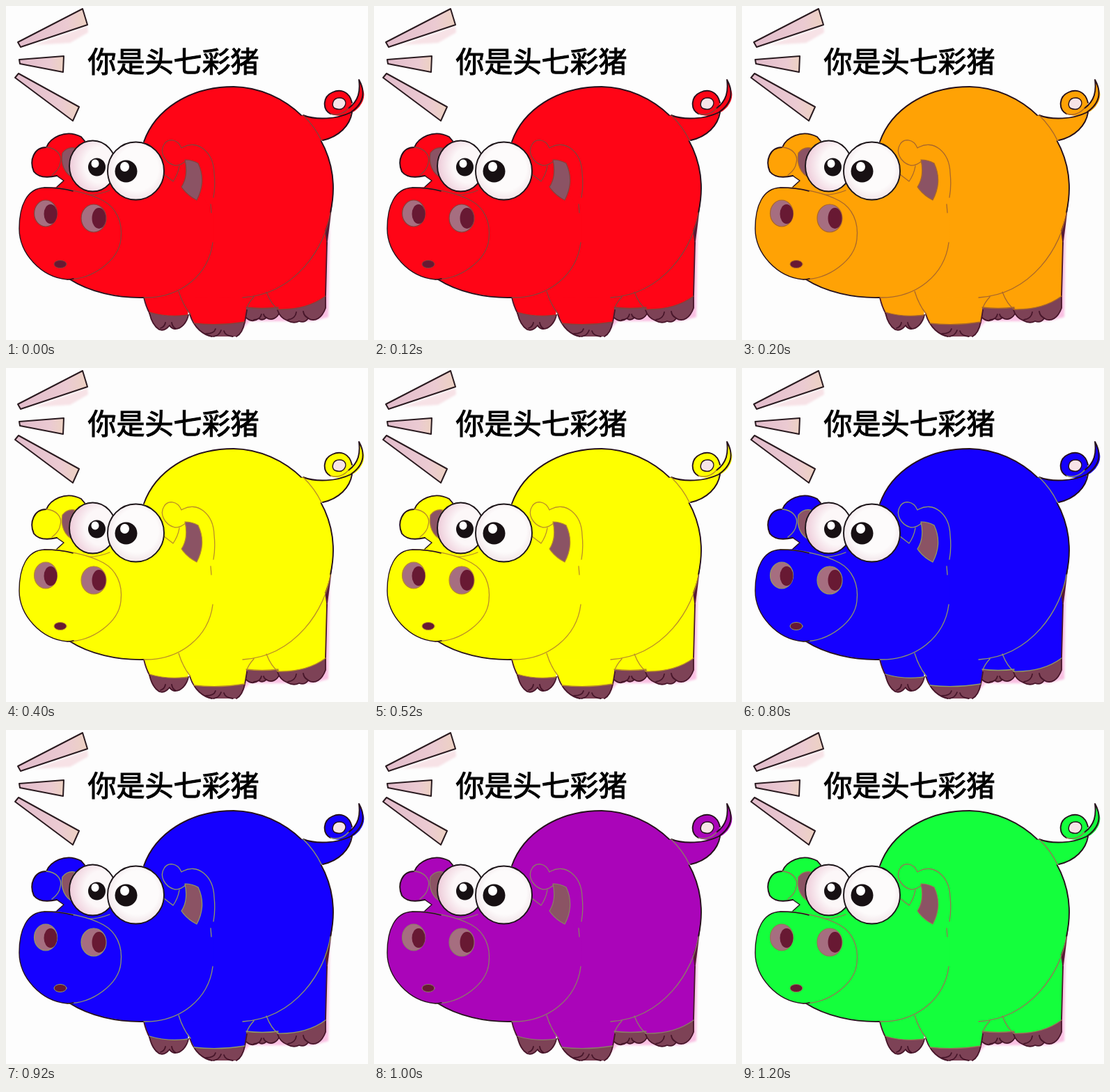
Write an HTML page that moves like this. It is 520 px wide and 480 px high and loops after 1.4 s.

```html
<!DOCTYPE html>
<html lang="zh">
<head>
<meta charset="utf-8">
<style>
  html, body { margin: 0; width: 100%; height: 100%; overflow: hidden; background: #fdfdfd; }
  svg { display: block; width: 520px; height: 480px; }
  text { font: 500 41px "Noto Sans CJK SC", "Noto Sans CJK", sans-serif; stroke: #000; stroke-width: 1.1; }
  path, ellipse { stroke-linejoin: round; stroke-linecap: round; }
  .skin { fill: var(--skin); }
  .edge { fill: none; stroke: #25101b; stroke-width: 1.9; }
  .thin { stroke-width: 1.4; }
  .line { fill: none; stroke: var(--line); stroke-width: 1.3; }
  .hoof { fill: #7d4256; }
  .toe { fill: none; stroke: #47162a; stroke-width: 1.8; }
  .mauve { fill: #a66e80; stroke: var(--line); stroke-width: 1.2; }
  .ear { fill: #8b5364; }
  .dark { fill: #681933; }
  .eye { stroke: #1c1519; stroke-width: 1.9; }
  .ray { fill: url(#rayFill); stroke: #2a1b20; stroke-width: 2; }
</style>
</head>
<body>
<svg id="stage" viewBox="0 0 520 480">
  <defs>
    <linearGradient id="rayFill">
      <stop offset="0" stop-color="#e2bccb"/>
      <stop offset=".7" stop-color="#ebcad2"/>
      <stop offset="1" stop-color="#edd2c2"/>
    </linearGradient>
    <radialGradient id="eyeFill" cx=".52" cy=".46" r=".58">
      <stop offset=".65" stop-color="#fdfbfb"/>
      <stop offset="1" stop-color="#efe0e5"/>
    </radialGradient>
    <radialGradient id="eyePink" cx=".68" cy=".48" r=".7">
      <stop offset=".5" stop-color="#fcf7f8"/>
      <stop offset="1" stop-color="#edc8d7"/>
    </radialGradient>
    <filter id="soft" x="-20%" y="-20%" width="140%" height="140%"><feGaussianBlur stdDeviation="1.5"/></filter>
  </defs>
  <rect width="520" height="480" fill="#fdfdfd"/>

  <!-- rays -->
  <path d="M40 56L117 29L118 38L92 53Z" fill="#f7e2e6" filter="url(#soft)"/>
  <path class="ray" d="M17 52L110 4L117 27L21 59Z"/>
  <path class="ray" d="M19 77L83 72L82 95L20 83Z"/>
  <path class="ray" d="M18 97L105 145L96 165L13 103Z"/>

  <text x="117.5" y="95">你是头七彩猪</text>

  <!-- pink fringe -->
  <path d="M465 300L463 447L440 453L350 453L336 468L342 440L458 420L460 330Z" fill="#f9c0e2" filter="url(#soft)"/>

  <!-- legs -->
  <path class="skin" d="M196 412L206 444L261 446L264 414Z"/>
  <path class="skin" d="M340 405L466 285L461 330L459 420Q430 440 390 439L345 435Z"/>
  <path class="skin" d="M246 404L265 446L272 458L342 458L356 405Z"/>
  <path d="M469 282L464 322L461 345L458 322Z" fill="#571a35"/>
  <path class="toe" d="M198 419Q201 432 206 441M461 340L459 417"/>
  <path class="hoof" d="M205 440Q232 448 261 444C260 454 252 465 242 464Q237 463 235 459Q228 468 220 465C212 460 208 450 205 440Z"/>
  <path class="toe" d="M206 441C208 450 212 460 220 465Q228 468 235 459Q237 463 242 464C252 465 260 454 262 444M222 463Q228 461 229 455M243 463Q239 461 238 455"/>
  <path class="hoof" d="M345 433Q368 436 391 433L393 440C390 448 382 453 374 448Q368 453 363 449Q354 456 345 448Z"/>
  <path class="toe" d="M345 448Q354 456 363 449Q368 453 374 448C382 453 390 448 393 440M356 451Q365 451 367 443M375 448Q371 447 370 443"/>
  <path class="hoof" d="M390 436Q432 437 459 417L459 434C454 448 444 455 434 449Q429 456 421 453Q413 457 404 452C396 449 392 443 390 436Z"/>
  <path class="toe" d="M459 418L459 434C454 448 444 455 434 449Q429 456 421 453Q413 457 404 452C396 449 392 443 390 437M405 451Q416 449 417 440M435 449Q428 446 427 439"/>
  <path class="hoof" d="M264 443L270 456Q306 460 343 454C341 464 337 472 331 475H296C284 473 270 463 264 443Z"/>
  <path class="toe" d="M264 443C270 463 284 473 296 475M343 454C341 464 337 472 331 475M287 471Q299 471 301 464M298 475Q306 474 309 466M326 475Q315 474 313 467M343 455L346 437"/>
  <path class="line" d="M206 440Q232 448 261 444M345 433Q368 436 391 433M390 436Q432 437 459 417M270 456Q306 460 343 454"/>

  <!-- body -->
  <path class="skin" d="M198 196C214 150 262 116 327 116C400 117 470 180 470 262C470 328 424 411 340 419L200 420L160 300Z"/>
  <path class="edge" d="M198 195C214 150 262 116 327 116C400 117 470 180 470 262Q470 278 466 297"/>

  <!-- tail -->
  <path class="skin" d="M423 158L428 157C445 164 475 163 496 152C494 173 478 190 453 193L447 196Z"/>
  <path class="skin" fill-rule="evenodd" d="M497 138C493 122 480 119 469 124C455 130 454 148 466 155C474 159 486 159 495 153ZM485 146C491 139 487 132 479 132C469 132 467 143 472 147C477 149 482 149 485 146Z"/>
  <path class="skin" d="M507 106C509 122 507 136 492 147L478 158C500 158 517 140 514 124Q512 114 507 106Z"/>
  <path class="edge" d="M427 157C445 164 475 163 495 153C514 140 517 124 507 106C509 122 507 136 492 147M497 139C493 122 480 119 469 124C455 130 454 148 466 155M497 153C494 172 478 188 455 193"/>
  <path class="edge thin" d="M485 146C491 139 487 132 479 132C469 132 467 143 472 147C477 149 482 149 485 146Z" style="fill:#f7e4e7"/>
  <path class="line" d="M466 155Q481 159 492 147M427 157Q444 174 453 193"/>
  <path class="line" d="M466 297C459 345 417 414 340 419M248 410Q254 430 265 443M356 418Q348 427 346 434M374 411Q381 429 391 436"/>

  <!-- far ear and head -->
  <path class="skin" d="M40 238C33 222 40 203 58 203C63 190 85 176 108 188L113 194L125 220L186 225L212 250L262 240L299 300L297 340C290 385 250 418 205 419C165 420 120 411 92 393L52 263L73 260L83 251L73 244C60 247 47 247 40 238Z"/>
  <path class="edge" d="M73 244C60 247 47 247 40 238C33 222 40 203 58 203C63 190 85 176 108 188L113 194M92 393C120 411 160 420 198 419"/>
  <path class="edge thin" d="M73 244L83 251L73 260"/>
  <path class="line" d="M58 203C72 204 81 214 78 225C77 234 70 240 66 243M198 419C250 420 291 387 297 340M97 268Q122 276 149 265"/>
  <path class="mauve ear" d="M81 211Q88 202 99 204C92 220 91 234 97 247C84 241 78 227 81 211Z"/>

  <!-- near ear -->
  <path class="line" d="M252 204C246 190 232 190 227 199C220 210 228 225 242 229Q250 230 259 222M252 204C275 190 298 210 299 240Q301 259 298 275M294 285L295 297M249 230Q247 242 240 252L227 242"/>
  <path class="mauve ear" d="M257 221Q267 221 276 226C285 245 283 262 274 279Q260 272 252 260C260 248 260 235 257 221Z"/>

  <!-- eyes -->
  <ellipse class="eye" cx="124.500" cy="230" rx="33.500" ry="36.500" fill="url(#eyePink)"/>
  <ellipse class="eye" cx="186.500" cy="237" rx="40.500" ry="41.500" fill="url(#eyeFill)"/>
  <ellipse cx="130.500" cy="231.500" rx="12.500" ry="13" fill="#171013"/>
  <ellipse cx="128" cy="226.500" rx="5.500" ry="6" fill="#fff"/>
  <ellipse cx="172.500" cy="237.500" rx="16" ry="16" fill="#171013"/>
  <ellipse cx="170.500" cy="231" rx="6.500" ry="7" fill="#fff"/>

  <!-- snout -->
  <path class="skin" d="M19 320C19 287 30 262 55 261C86 261 120 269 140 280C158 290 168 310 165 335C162 365 125 393 88 393C50 390 19 355 19 320Z"/>
  <path class="line" d="M55 261C86 261 120 269 140 280C158 290 168 310 165 335C162 365 125 393 88 393"/>
  <path class="edge thin" d="M97 392Q92 393 88 393C50 390 19 355 19 320C19 287 30 262 55 261Q78 261 96 266"/>
  <ellipse class="mauve" cx="57" cy="298" rx="16.500" ry="19"/>
  <ellipse class="dark" cx="64" cy="299" rx="9.500" ry="14"/>
  <ellipse class="mauve" cx="126" cy="305" rx="18" ry="20"/>
  <ellipse class="dark" cx="133.500" cy="305" rx="10" ry="15"/>
  <ellipse class="dark" cx="78" cy="371" rx="9" ry="5.500" style="stroke:var(--line)"/>
</svg>
<script>
  const STEP = 200;
  const looks = [
    ["#ff0516", "#874039"],
    ["#ffa205", "#a9672b"],
    ["#feff00", "#b98d28"],
    ["#05ffe1", "#a09045"],
    ["#1500ff", "#929b66"],
    ["#aa05b9", "#8c7c68"],
    ["#14ff3c", "#937654"]
  ];
  const style = document.getElementById("stage").style;
  const start = performance.now();

  function draw(ms) {
    const [skin, line] = looks[Math.floor(ms / STEP) % looks.length];
    style.setProperty("--skin", skin);
    style.setProperty("--line", line);
  }

  function tick() {
    draw(performance.now() - start);
    requestAnimationFrame(tick);
  }
  tick();
</script>
</body>
</html>
```
